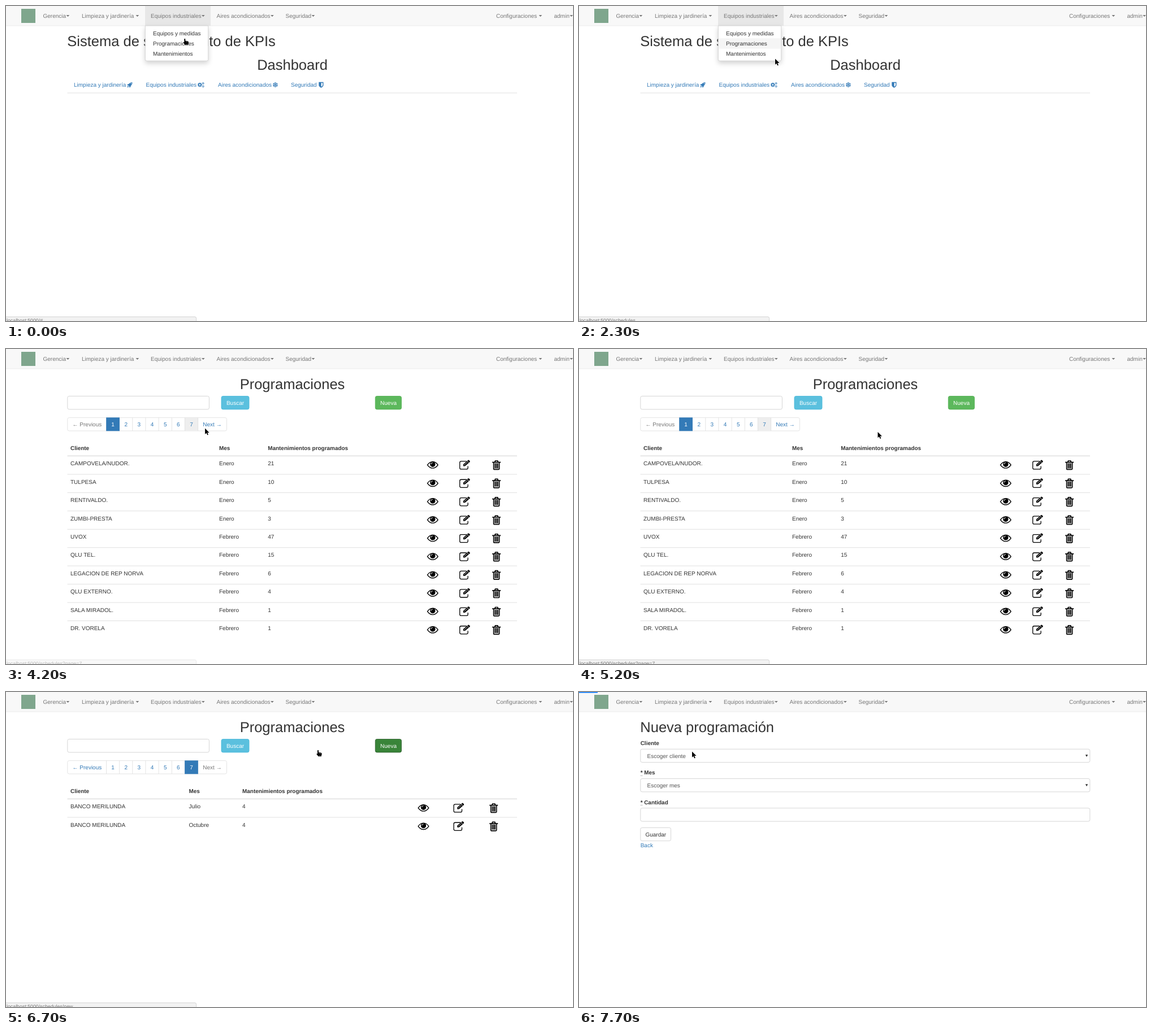
An HTML page for the animation above (8000 ms loop, 1003 by 558 pixels).

```html
<!DOCTYPE html>
<html lang="es">
<head>
<meta charset="utf-8">
<title>Programaciones</title>
<style>
html, body { margin: 0; width: 100%; height: 100%; overflow: hidden; background: #fff; }
svg { display: block; width: 1003px; height: 558px; }
text { font: 10px "Liberation Sans", Arial, sans-serif; fill: #333; white-space: pre; text-rendering: geometricPrecision; }
.h { font-size: 25.5px; }
.b { font-weight: bold; font-size: 9.95px; }
.m { text-anchor: middle; }
.nav { fill: #777; }
.link { fill: #337ab7; }
.field { fill: #555; }
.white { fill: #fff; }
.status { font-size: 8.8px; fill: #777; }
.drop { filter: drop-shadow(0 4px 4px rgba(0,0,0,.175)); }
.line { fill: none; stroke: #000; }
.icon { fill: none; stroke: #337ab7; }
</style>
</head>
<body>
<svg id="stage" viewBox="0 0 1003 558"></svg>
<script>
const LOOP = 8000, STEP = 100;

const text = (x, y, s, cls = '') => `<text x="${x}" y="${y}" class="${cls}">${s}</text>`;
const rect = (x, y, w, h, fill, extra = '') =>
  `<rect x="${x}" y="${y}" width="${w}" height="${h}" fill="${fill}" ${extra}/>`;
const box = (x, y, w, fill = '#fff', edge = '#ccc', id = '') =>
  rect(x, y, w, 23.4, fill, `rx="2.9" stroke="${edge}" stroke-width=".8" ${id && `id="${id}"`}`);
const rule = (y, h = .9) => rect(108.5, y, 795.5, h, '#ddd');
const path = (d, attrs = '') => `<path d="${d}" ${attrs}/>`;
const group = (id, body) => `<g id="${id}">${body}</g>`;
const at = (x, y, body, scale = 1) => `<g transform="translate(${x} ${y}) scale(${scale})">${body}</g>`;

// Navigation bar; each caret is placed after its label
const MENU = {
  'Gerencia': 65.5, 'Limpieza y jardinería ': 134, 'Equipos industriales': 256, 'Aires acondicionados': 372.5,
  'Seguridad': 494.5, 'Configuraciones ': 867, 'admin': 969.5
};
const navbar = rect(0, 0, 1003, 35, '#f8f8f8') + rect(0, 34.6, 1003, .8, '#e7e7e7') +
  rect(246, 0, 116, 35, '#e7e7e7', 'id="open"') + rect(27, 5, 25, 25, '#7fa68d') +
  group('menu', Object.entries(MENU).map(([s, x]) => text(x, 20.5, s, 'nav')).join(''));

const dropdown = group('dropdown',
  path('M246.3 35H357.7V94.5q0 2.7-2.7 2.7H249q-2.7 0-2.7-2.7z',
    'class="drop" fill="#fff" stroke="#ccc" stroke-width=".8"') +
  rect(246.7, 57.2, 110.6, 18.4, '#f5f5f5', 'id="itemHover"') +
  ['Equipos y medidas', 'Programaciones', 'Mantenimientos']
    .map((s, i) => text(260, 51.6 + 18.4 * i, s)).join(''));

// Dashboard page
const gear = (x, y, r) => at(x, y,
  '<circle r="1" class="icon" stroke-width=".75"/>' +
  '<circle r="1.55" class="icon" stroke-width=".5" pathLength="16" stroke-dasharray="1"/>', r);
const rocket = at(219, 139.8,
  path('M5-5Q.5-5-1.8-1.8L-4.2-1.4-5.2.8-2.8 1-1 2.8-.8 5.2 1.4 4.2 1.8 1.8Q5-.5 5-5z', 'class="link"') +
  path('M-5 5Q-4.8 2.2-3.2 2L-2 3.2Q-2.2 4.8-5 5z', 'class="link"') +
  '<circle cx="2.6" cy="-2.6" r=".8" fill="#fff"/>', .9);
const cogs = gear(342.8, 139.6, 2.2) + [137, 142.4].map(y => gear(348.7, y, 1.15)).join('');
const flake = at(476.4, 139.6, [0, 60, 120].map(a =>
  path('M0-5V5M-1.7-4.3L0-2.6 1.7-4.3M-1.7 4.3L0 2.6 1.7 4.3',
    `class="icon" stroke-width="1.1" transform="rotate(${a})"`)).join(''), .9);
const shield = at(557.4, 139.6,
  path('M-4.3-5H4.3V.6Q4 3.6 0 5.4-4 3.6-4.3.6z', 'class="link"') +
  path('M.2-3.6H2.9V.5Q2.6 2.4.2 3.7z', 'fill="#fff"'), .95);

const TABS = { 'Limpieza y jardinería': 120, 'Equipos industriales': 247.5, 'Aires acondicionados': 375, 'Seguridad': 504 };
const home = group('home',
  text(108.3, 71.2, 'Sistema de seguimiento de KPIs', 'h') + text(506.5, 113, 'Dashboard', 'h m') +
  Object.entries(TABS).map(([s, x]) => text(x, 143.4, s, 'link')).join('') +
  rocket + cogs + flake + shield + rule(153.6));

// Schedule list
const eye = path('M-9.3 0Q-5.5-5.7 0-5.7T9.3 0Q5.5 5.7 0 5.7T-9.3 0z', 'class="line" stroke-width="1.4"') +
  '<circle cy="-1.2" r="4.7"/>' + path('M-2.8-1.2A2.8 2.8 0 0 1 0-4', 'fill="none" stroke="#fff"');
const edit = path('M3.4-6.6H-6Q-8.5-6.6-8.5-4.2V5Q-8.5 7.5-6 7.5H3.4Q5.9 7.5 5.9 5V2', 'class="line" stroke-width="1.3"') +
  path('M-2.4 2V-1L5.9-8.4Q7-9.2 8-8.3L9.2-7Q10-6.1 9.1-5.2L.7 2z') +
  path('M4.5-7.4L7.8-3.8M-1 .3L5-5', 'stroke="#fff" stroke-width=".8"');
const trash = path('M-5-4.6V6.3Q-5 8-3.4 8H3.4Q5 8 5 6.3V-4.6M-7.5-4.7H7.5M-3.1-4.8L-2.1-7.4H2.1L3.1-4.8M-2.3-3V6M0-3V6M2.3-3V6',
  'class="line" stroke-width="1.7"');

const PAGE_W = 23.15, PAGES = 7;
const pageX = n => 177.5 + PAGE_W * (n - 1);

function pager(active) {
  let edges = '', labels = '';
  for (let n = 1; n <= PAGES + 1; n++) edges += `M${pageX(n)} 121.6v23.4`;
  for (let n = 1; n <= PAGES; n++)
    labels += text(pageX(n + .5), 136.8, n, 'm ' + (n === active ? 'white' : 'link'));
  const hovers = active > 1 ? '' :
    rect(pageX(7), 122, PAGE_W, 22.6, '#eee', 'id="hover7"') + rect(pageX(8), 122, 50, 22.6, '#eee', 'id="hoverNext"');
  return box(108.8, 121.6, 281.7, '#fff', '#ddd') + hovers +
    path(edges, 'stroke="#ddd" stroke-width=".8"') + rect(pageX(active) - .3, 121.3, PAGE_W + .6, 24, '#337ab7') + labels +
    text(143.4, 136.8, '← Previous', 'm ' + (active === 1 ? 'nav' : 'link')) +
    text(365, 136.8, 'Next →', 'm ' + (active === PAGES ? 'nav' : 'link'));
}

function table(id, active, cols, iconX, iconGap, rows) {
  const cells = (row, y, cls) => row.map((s, c) => text(cols[c], y, s, cls)).join('');
  const body = rows.map((row, i) => {
    const dy = 32.44 * i;
    return (i ? rule(189.1 + dy) : '') + cells(row, 206.2 + dy) +
      [eye, edit, trash].map((shape, c) => at(iconX + iconGap * c, 205.4 + dy, shape)).join('');
  }).join('');
  return group(id, pager(active) + cells(['Cliente', 'Mes', 'Mantenimientos programados'], 179.2, 'b') +
    rule(188.7, 1.4) + body);
}

const list = group('list',
  text(506.5, 71.2, 'Programaciones', 'h m') + box(108.8, 83.5, 250.6) +
  box(381, 83.5, 49, '#5bc0de', '#46b8da') + text(405.5, 99, 'Buscar', 'm white') +
  box(653.3, 83.5, 46.2, '#5cb85c', '#4cae4c', 'add') + text(676.5, 99, 'Nueva', 'm white') +
  table('first', 1, [114, 377, 463.2], 754.8, 56.4, [
    ['CAMPOVELA/NUDOR.', 'Enero', 21], ['TULPESA', 'Enero', 10], ['RENTIVALDO.', 'Enero', 5],
    ['ZUMBI-PRESTA', 'Enero', 3], ['UVOX', 'Febrero', 47], ['QLU TEL.', 'Febrero', 15],
    ['LEGACION DE REP NORVA', 'Febrero', 6], ['QLU EXTERNO.', 'Febrero', 4],
    ['SALA MIRADOL.', 'Febrero', 1], ['DR. VORELA', 'Febrero', 1]
  ]) +
  table('last', 7, [114, 323.5, 418], 738.5, 62.1, [
    ['BANCO MERILUNDA', 'Julio', 4], ['BANCO MERILUNDA', 'Octubre', 4]
  ]));

// New schedule form
const fields = ['Cliente', 'Mes', 'Cantidad'].map((label, i) => {
  const y = 94 + 52.25 * i, hint = ['Escoger cliente', 'Escoger mes'][i];
  const star = i ? text(108.7, y, '*', 'b') + path(`M109 ${y + 2}h3.6`, 'stroke="#555" stroke-width=".8" stroke-dasharray=".8"') : '';
  return star + text(i ? 115.2 : 108.7, y, label, 'b') + box(108.8, y + 7.2, 795) +
    (hint ? text(120.5, y + 22.5, hint, 'field') + path(`M895.8 ${y + 16.9}h4.4l-2.2 4.2z`, 'fill="#333"') : '');
}).join('');
const form = group('form',
  text(108.3, 71.2, 'Nueva programación', 'h') + fields +
  box(108.8, 240.3, 53.7) + text(135.8, 255.6, 'Guardar', 'm') + text(108.7, 274.6, 'Back', 'link'));

const status = group('status',
  path('M-1 560V550.6H334q2.6 0 2.6 2.6V560z', 'fill="#f2f2f2" stroke="#ccc" stroke-width=".8"') +
  '<text id="url" x="1" y="560.4" class="status"></text>');

const OUTLINE = 'stroke="#fff" stroke-width=".7" paint-order="stroke"';
const cursors = group('cursor',
  group('arrow', path('M0 0V11L2.6 8.7 4.4 12.7 6.2 12 4.4 8.1H8z', OUTLINE)) +
  group('hand', path('M2.1 1.1Q3.1-.4 4.2 1.1V4.4L8.6 5.3Q10.5 5.8 10.3 8L9.1 12.6H4L.4 8.3Q0 6.7 2.1 7.2z', OUTLINE) +
    path('M6 5.4V7.4M8 5.8V7.6M4.4 11.4H8.6', 'stroke="#aaa" stroke-width=".7"')) +
  group('beam', path('M-2.6.4Q0 .2 0 1.6 0 .2 2.6.4M0 1.4V11.8M-2.6 12.8Q0 13 0 11.6 0 13 2.6 12.8',
    'fill="none" stroke="#333" stroke-width="1.1"')));

const $ = id => document.getElementById(id);
$('stage').innerHTML = home + list + form + navbar + dropdown +
  rect(0, 0, 33, 1.5, '#0076ff', 'id="progress"') + status + cursors;
$('menu').innerHTML += [...$('menu').children].map(label =>
  path(`M${+label.getAttribute('x') + label.getComputedTextLength() + .5} 16h5.7l-2.85 2.9z`, 'class="nav"')).join('');

// Pointer moves: start, end, x, y and the shape it takes on arrival
const MOVES = [
  [-1, 0, 313.3, 57.3, 'hand'], [100, 200, 307, 75.5, 'hand'], [400, 800, 298, 68, 'hand'],
  [1900, 2300, 347, 93.5, 'arrow'], [2600, 2700, 382, 92, 'beam'], [2700, 2800, 409, 98.5, 'arrow'],
  [3000, 3500, 365, 137, 'hand'], [3600, 3800, 321.5, 137.5, 'hand'], [3900, 4000, 321.5, 137.5, 'arrow'],
  [4100, 4400, 376.5, 143, 'arrow'], [4500, 5200, 528.5, 147, 'arrow'], [5200, 6100, 686.5, 92.5, 'hand'],
  [6400, 6500, 579, 103, 'hand'], [6600, 6700, 549, 102.5, 'hand'], [6700, 7600, 200, 105.5, 'arrow']
];
// Status bar: shown from, gone by, address
const LINKS = [
  [0, LOOP, '#'], [200, 2900, 'schedules'], [3500, LOOP, 'schedules?page=2'], [3800, 4300, 'schedules?page=7'],
  [4300, 5600, 'schedules?page=7'], [6300, 7700, 'schedules/new']
];
const FADE = 200;

const easeOut = k => 1 - (1 - k) ** 2;
const clamp = k => Math.max(0, Math.min(1, k));
const show = (id, on) => { $(id).style.display = on ? '' : 'none'; };

function pointer(t) {
  let x = 0, y = 0, shape;
  for (const [from, to, toX, toY, next] of MOVES) {
    const k = easeOut(clamp((t - from) / (to - from)));
    x += (toX - x) * k;
    y += (toY - y) * k;
    if (t >= to) shape = next;
  }
  return { x, y, shape };
}

function render(t) {
  const page = t < 2700 ? 'home' : t < 7600 ? 'list' : 'form';
  for (const id of ['home', 'list', 'form']) show(id, id === page);
  show('open', page === 'home');
  show('dropdown', page === 'home');
  show('itemHover', t >= 200);
  show('first', t < 5400);
  show('last', t >= 5400);
  show('hoverNext', t >= 3500 && t < 3700);
  show('hover7', t >= 3700);
  show('progress', t >= 7700);

  const [fill, edge] = t < 6300 ? ['#5cb85c', '#4cae4c'] : t < 6700 ? ['#449d44', '#398439'] : ['#398439', '#255625'];
  $('add').setAttribute('fill', fill);
  $('add').setAttribute('stroke', edge);

  const [, gone, url] = LINKS.filter(l => l[0] <= t).pop();
  $('url').textContent = 'localhost:5000/' + url;
  $('status').setAttribute('opacity', clamp((gone - t) / FADE));

  const { x, y, shape } = pointer(t);
  for (const id of ['arrow', 'hand', 'beam']) show(id, id === shape);
  $('cursor').setAttribute('transform', `translate(${x} ${y}) scale(.94)`);
}

const start = performance.now();
function tick() {
  const t = (performance.now() - start) % LOOP;
  render(Math.floor(t / STEP) * STEP);
  requestAnimationFrame(tick);
}
tick();
</script>
</body>
</html>
```
